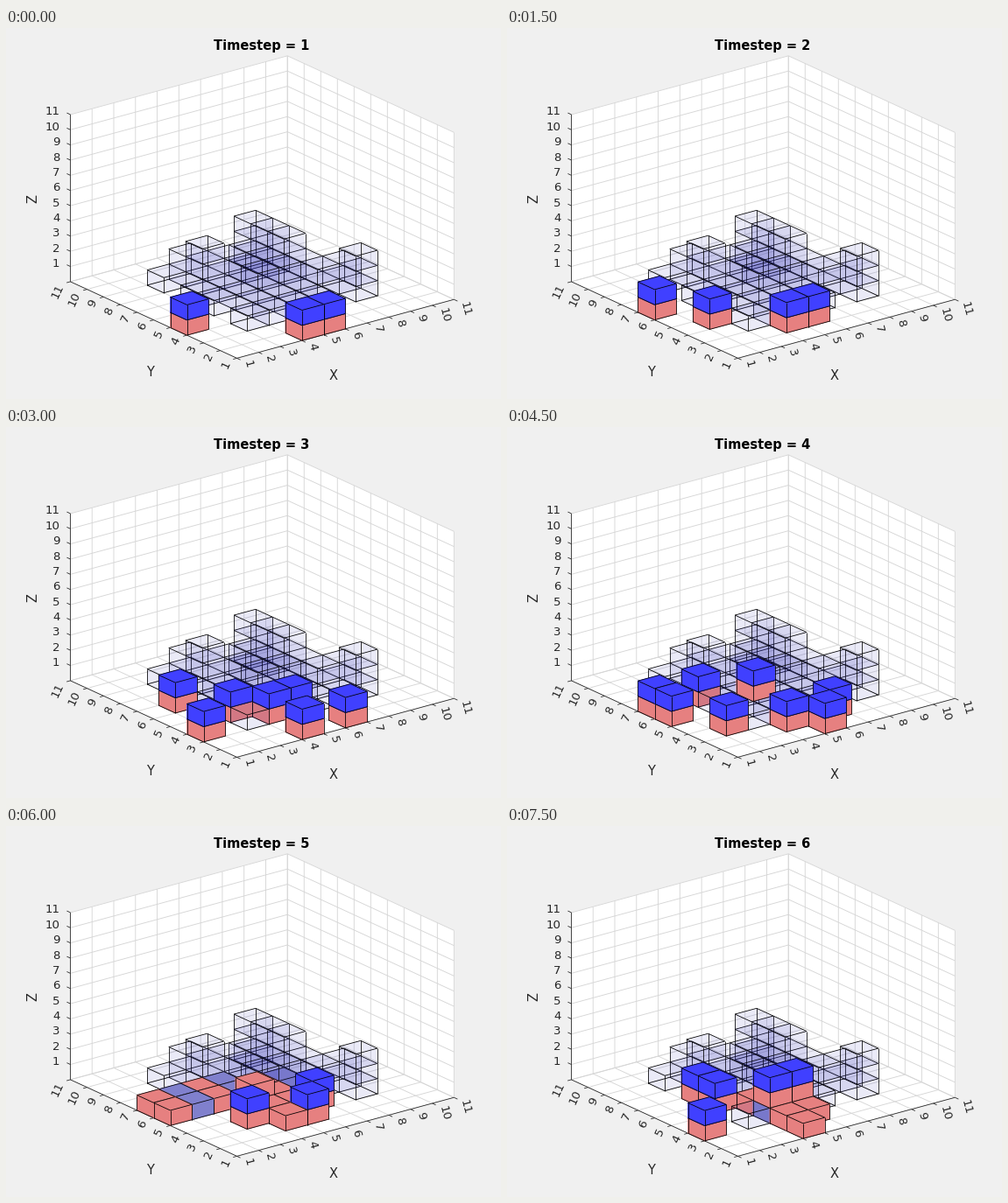
A matplotlib script for the animation above (8 s loop, 565 px wide and 424 px high).

```python
import numpy as np
import matplotlib.pyplot as plt
from matplotlib.animation import FuncAnimation
from matplotlib.collections import LineCollection, PolyCollection

W, H, DPI = 565, 424, 100
PX = 72 / DPI  # points per pixel
STEPS = 6
BLUE, RED, MAUVE = "#4040ff", "#e68080", "#8080cd"
GHOST = (0.2, 0.2, 0.73, 0.05)
CLEAR = (0, 0, 0, 0)
INK = "#262626"

# Orthographic view, stretched to the axes rectangle
ORIGIN = np.array([263.55, 377.36])
EX = np.array([24.78, -6.712])
EY = np.array([-19.01, -8.747])
EZ = np.array([0, -17.36])


def proj(i, j, k=0):
    return ORIGIN + i * EX + j * EY + k * EZ


# Heights of the planned structure: low apron, core, then towers and stairs
plan = np.zeros((10, 10), int)
plan[3:6, 2:6] = 1
plan[2, [2, 4, 5]] = 1
plan[4:7, 4:7] = 2
plan[6, 3] = 2
plan[6, 5:8] = 3
plan[3, 6] = 3
plan[2:4, 7] = 1, 2
plan[7, 2:4] = 3, 2

ALONG_X, ALONG_Y = (1, 0), (0, 1)
# Entry cell, heading, first step, number of steps in view
ROBOTS = [
    ((0, 3), ALONG_X, 0, 4),
    ((3, 0), ALONG_Y, 0, 3),
    ((4, 0), ALONG_Y, 0, 3),
    ((0, 5), ALONG_X, 1, 4),
    ((0, 2), ALONG_X, 2, 3),
    ((3, 0), ALONG_Y, 2, 2),
    ((5, 0), ALONG_Y, 2, 3),
    ((0, 4), ALONG_X, 3, 3),
    ((0, 5), ALONG_X, 3, 3),
    ((4, 0), ALONG_Y, 3, 3),
    ((0, 2), ALONG_X, 5, 1),
    ((3, 2), ALONG_Y, 5, 1),
]


def laid_blocks(step):
    if step == 4:
        cells = {(i, j, 0): RED for i, j in np.argwhere(plan).tolist()
                 if i < 5 and i + j <= 8}
        cells.update({(3, 1, 0): RED, (3, 3, 1): RED,
                      (3, 4, 0): MAUVE, (5, 4, 0): MAUVE})
        return cells
    if step == 5:
        cells = dict.fromkeys([(3, 0, 0), (3, 1, 0), (4, 1, 0),
                               (3, 3, 0), (4, 2, 0)], RED)
        cells[3, 2, 0] = MAUVE
        return cells
    return {}


def world(step):
    cells = {(i, j, k): GHOST for i, j in np.argwhere(plan).tolist()
             for k in range(plan[i, j])}
    cells.update(laid_blocks(step))
    for (i, j), (di, dj), start, count in ROBOTS:
        age = step - start
        if not 0 <= age < count:
            continue
        i, j = i + age * di, j + age * dj
        if step == 4 and j >= 4:  # stretched flat, load behind
            cells[i - di, j - dj, 0] = RED
            cells[i, j, 0] = MAUVE
        else:  # climbs the laid blocks once they are there
            k = int(step >= 3 and i in (3, 4) and j in (2, 3))
            cells[i, j, k] = RED
            cells[i, j, k + 1] = BLUE
    return cells


def cube_faces(cell):
    """Three hidden faces first, then the three that face the viewer."""
    def face(axis, side):
        pts = []
        for a, b in ((0, 0), (1, 0), (1, 1), (0, 1)):
            c = [a, b]
            c.insert(axis, side)
            pts.append(tuple(p + q for p, q in zip(cell, c)))
        return pts
    return [face(0, 1), face(1, 1), face(2, 0),
            face(0, 0), face(1, 0), face(2, 1)]


def build(cells):
    """Back-to-front polygons; edges are two-point ones, drawn only once."""
    verts, fills, edges = [], [], []
    seen = set()

    def add(pts, fill, edge):
        verts.append([proj(*p) for p in pts])
        fills.append(fill)
        edges.append(edge)

    for cell in sorted(cells, key=lambda c: (-c[0], -c[1], c[2])):
        color = cells[cell]
        solid = color != GHOST
        faces = cube_faces(cell)[3 * solid:]
        outline = set()
        for f in faces:
            add(f, color, color if solid else CLEAR)
            outline |= {tuple(sorted(e)) for e in zip(f, f[1:] + f[:1])}
        for e in sorted(outline if solid else outline - seen):
            add(e, CLEAR, "black")
        seen |= outline
    return verts, fills, edges


SCENES = [build(world(s)) for s in range(STEPS)]

fig = plt.figure(figsize=(W / DPI, H / DPI), dpi=DPI, facecolor="#f0f0f0")
ax = fig.add_axes([0, 0, 1, 1])
ax.set_xlim(0, W)
ax.set_ylim(H, 0)
ax.axis("off")

# White floor and walls
for corners in ([(0, 0, 0), (10, 0, 0), (10, 10, 0), (0, 10, 0)],
                [(0, 10, 0), (10, 10, 0), (10, 10, 11), (0, 10, 11)],
                [(10, 10, 0), (10, 0, 0), (10, 0, 11), (10, 10, 11)]):
    ax.fill(*zip(*[proj(*c) for c in corners]), color="white", lw=0.5)

grid = []
for n in range(11):
    grid.append([proj(n, 0), proj(n, 10), proj(n, 10, 11)])
    grid.append([proj(0, n), proj(10, n), proj(10, n, 11)])
for n in range(12):
    grid.append([proj(0, 10, n), proj(10, 10, n), proj(10, 0, n)])
ax.add_collection(LineCollection(grid, colors="#d6d6d6", linewidths=0.9 * PX))

axis_lines = [[proj(0, 10, 11), proj(0, 10), proj(0, 0), proj(10, 0)]]


def tick(at, step, shift, text, **style):
    axis_lines.append([at, at + step])
    ax.text(*(at + shift), text, color=INK, fontsize=13.33 * PX,
            family="DejaVu Sans", rotation_mode="anchor", va="center", **style)


for n in range(11):
    tick(proj(n, 0), (4, 1.9), (11, 3), n + 1, rotation=-75, ha="left")
    tick(proj(0, n), (-4.3, 1.2), (-11, 3.3), n + 1, rotation=65, ha="right")
    tick(proj(0, 10, n + 1), (-4, -1.9), (-12, -3), n + 1, ha="right")
ax.add_collection(LineCollection(axis_lines, colors=INK, linewidths=0.8 * PX))


def label(x, y, text, **style):
    return ax.text(x, y, text, fontsize=14.67 * PX, family="DejaVu Sans",
                   ha="center", va="center", **style)


label(374, 397, "X", color=INK)
label(164, 394, "Y", color=INK)
label(31, 194.5, "Z", color=INK, rotation=90)
title = label(291.5, 20.5, "Timestep = 1", color="black", weight="bold")

cubes = PolyCollection([], linewidths=0.8 * PX, zorder=3)
ax.add_collection(cubes, autolim=False)


def update(frame):
    step = frame // 3
    verts, fills, edges = SCENES[step]
    cubes.set_verts(verts)
    cubes.set_facecolor(fills)
    cubes.set_edgecolor(edges)
    title.set_text(f"Timestep = {step + 1}")
    return cubes, title


anim = FuncAnimation(fig, update, frames=16, interval=500, repeat=True,
                     repeat_delay=0, init_func=lambda: update(0))
plt.show()
```
